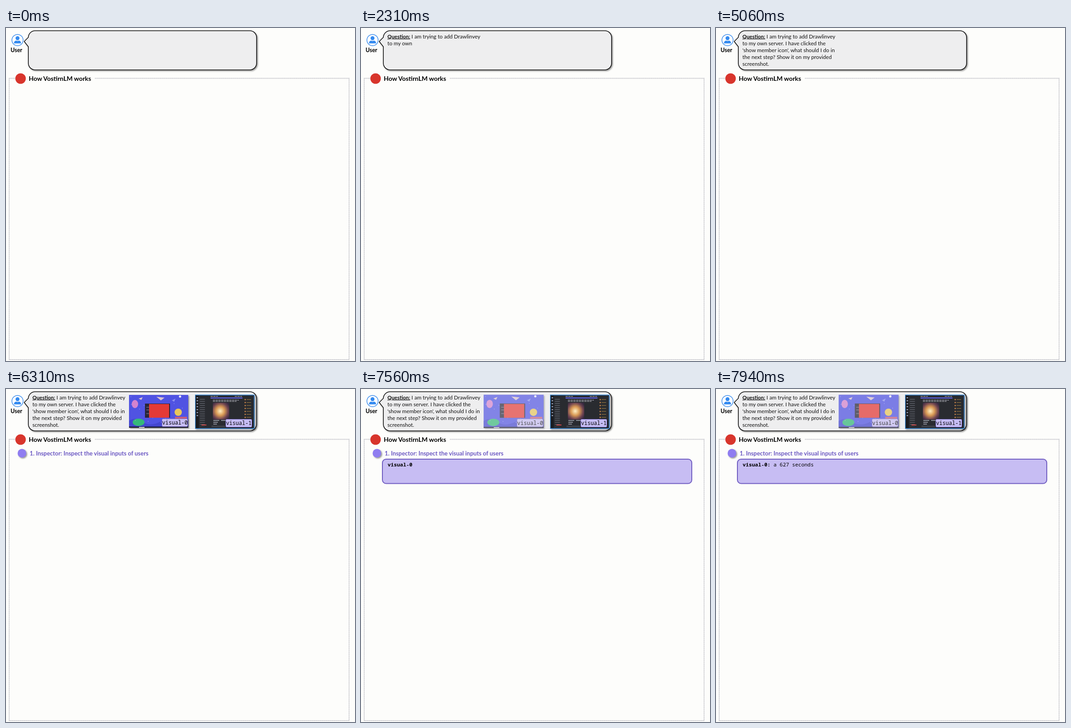
These frames come from a looping animation (766 px wide and 731 px high, 8 s). An HTML page:

```html
<!DOCTYPE html>
<html lang="en">
<head>
<meta charset="utf-8">
<title>Question and inspector</title>
<style>
  html, body { margin: 0; width: 100%; height: 100%; overflow: hidden; background: #fdfdfb; }
  svg { display: block; }
  text { font-family: Lato, sans-serif; white-space: pre; }
  .bold { font-weight: 700; }
  .key { font-weight: 700; font-size: 11.4px; text-decoration: underline; }
  .question { font-size: 11.7px; fill: #111; }
  .mono { font-family: "Noto Sans Mono", monospace; font-size: 11.3px; }
  .tag rect { fill: #c6bdf4; stroke: #8577d2; filter: drop-shadow(1px 1px 1px #0007); }
  .tag text { font-size: 11.7px; }
  .shadow { filter: drop-shadow(2px 2px 1.5px #0006); }
</style>
</head>
<body>
<svg width="766" height="731" viewBox="0 0 766 731">
  <defs>
    <radialGradient id="glow" cx=".45" cy=".5" r=".65">
      <stop offset="0" stop-color="#fff0c4"/>
      <stop offset=".4" stop-color="#d99a55"/>
      <stop offset=".75" stop-color="#6d4350"/>
      <stop offset="1" stop-color="#35283f"/>
    </radialGradient>
  </defs>

  <!-- user and speech bubble -->
  <circle cx="25.3" cy="26.5" r="12.3" fill="#fff" stroke="#3d8ded" stroke-width="1.5"/>
  <g fill="#338af0">
    <circle cx="25.3" cy="22.4" r="4.3"/>
    <path d="M17.5 33.8c0-4 2.5-6 5-6q2.8 1.4 5.6 0c2.6 0 5 2 5 6z"/>
  </g>
  <text class="bold" x="10" y="52.6" font-size="12.4">User</text>
  <path class="shadow" fill="#eeeeef" stroke="#111" stroke-width="1.6"
        d="M64 6H535a15 15 0 0 1 15 15V77a15 15 0 0 1-15 15H64a15 15 0 0 1-15-15V41L40 29.5 49 20.5A15 15 0 0 1 64 6z"/>
  <g id="question"></g>

  <!-- panel -->
  <path d="M195 110.5H753V728H7V110.5H20" fill="none" stroke="#cbcbd0" stroke-width="1.8" stroke-dasharray="2 .6"/>
  <circle cx="32" cy="111" r="11.5" fill="#d8352c"/>
  <text class="bold" x="50" y="115.6" font-size="13.8">How VostirnLM works</text>

  <!-- video thumbnail -->
  <g id="video" data-at="5440">
    <rect class="shadow" x="270" y="13" width="130" height="72" fill="#5053e2"/>
    <path d="M270 70q14-10 30 2t40-1 36 2 24-4V82H270z" fill="#4346cf"/>
    <path d="M270 82.5H400V85H270z" fill="#15152a"/>
    <path d="M292 84.2h12" stroke="#fff" stroke-width="1.4"/>
    <path d="M330 17l18 2-8 6zM291 21l9-3-3 6z" fill="#d9c3cf"/>
    <path d="M364 25l8-4-3 7z" fill="#8d8ff0"/>
    <circle cx="382" cy="16.5" r="2.5" fill="#e8e8fb"/>
    <ellipse cx="283" cy="33" rx="7" ry="9" fill="#d583cf"/>
    <ellipse cx="291" cy="73" rx="13" ry="8" fill="#35b879"/>
    <circle cx="378" cy="51" r="8" fill="#e8c65a"/>
    <rect x="371" y="61" width="26" height="8" fill="#c95e7d"/>
    <g id="stars" fill="#a9abfa"></g>
    <rect x="305" y="32" width="55" height="31" fill="#292638"/>
    <path d="M308 40h7M308 46h7M308 54h7M342 40h14M342 46h14" stroke="#6a6780" stroke-width="1.5"/>
    <rect x="314" y="33" width="44" height="30" fill="#e43a36"/>
    <g class="tag" data-at="6060">
      <rect x="342.5" y="65.5" width="56" height="17" rx="2"/>
      <text class="mono" x="342.7" y="78.3">visual-0</text>
    </g>
  </g>

  <!-- screenshot -->
  <g data-at="5440">
    <rect class="shadow" x="415.7" y="13.2" width="129" height="73.5" fill="#292b30" stroke="#3284d4" stroke-width="1.5"/>
    <path d="M416.5 14H423V86H416.5z" fill="#1b1c20"/>
    <path d="M449 18.5H519V21H449z" fill="#5c5fd8"/>
    <path d="M420 18V62" stroke="#9aa0b8" stroke-width="3" stroke-dasharray="2.5 4"/>
    <path d="M427 22V82" stroke="#777b84" stroke-width="11" stroke-dasharray="1 3.6" transform="translate(4)"/>
    <path d="M454 24.5h57M454 27.3h52M449 16.2h16M502 16.2h16" stroke="#c9cad0" stroke-width="1" stroke-dasharray="5 1"/>
    <rect x="454" y="30" width="36" height="37" fill="url(#glow)"/>
    <path d="M455 69h13M472 69h10M455 73h10M455 77h8" stroke="#8c8e98" stroke-width="2"/>
    <path d="M451 82h30" stroke="#42444c" stroke-width="3"/>
    <path d="M429 79h11" stroke="#c84444" stroke-width="2"/>
    <path d="M525 22V66" stroke="#d58b4b" stroke-width="2.5" stroke-dasharray="2.5 4"/>
    <path d="M533 22.5V66" stroke="#92743f" stroke-width="10" stroke-dasharray="1.2 5.3"/>
    <g class="tag" data-at="6060">
      <rect x="482.5" y="66.5" width="57" height="17" rx="2"/>
      <text class="mono" x="483" y="79.3">visual-1</text>
    </g>
  </g>

  <!-- first step -->
  <g data-at="6310">
    <circle class="shadow" cx="35" cy="141" r="9.5" fill="#8f7df0"/>
    <text class="bold" x="52" y="146.4" font-size="12.9" fill="#6b58c3">1. Inspector: Inspect the visual inputs of users</text>
  </g>
  <rect data-at="7000" x="47" y="154" width="679" height="53.5" rx="8" fill="#c7bdf3" stroke="#705dc1" stroke-width="2"/>
  <text class="mono" x="58.5" y="170"><tspan class="bold" data-at="7500">visual-0</tspan><tspan class="bold" data-at="7630">:</tspan><tspan data-at="7720"> a</tspan><tspan data-at="7820"> 627</tspan><tspan data-at="7930"> seconds</tspan></text>
</svg>

<script>
const LOOP = 8000;
const SVG = "http://www.w3.org/2000/svg";
const lines = [
  "Question: I am trying to add Drawlinvey",
  "to my own server. I have clicked the",
  "'show member icon', what should I do in",
  "the next step? Show it on my provided",
  "screenshot."
];
// word index and the time at which it is typed
const pace = [[0, 1060], [9, 2310], [10, 2440], [23, 3940], [31, 4940]];

function add(parent, tag, attrs, text = "") {
  const el = document.createElementNS(SVG, tag);
  for (const name in attrs) el.setAttribute(name, attrs[name]);
  el.textContent = text;
  return parent.appendChild(el);
}

function wordTime(i) {
  const k = Math.max(1, pace.findIndex(([n]) => n >= i));
  const [n0, t0] = pace[k - 1], [n1, t1] = pace[k];
  return t0 + (t1 - t0) * (i - n0) / (n1 - n0);
}

let count = 0;
lines.forEach((line, row) => {
  const text = add(question, "text", { class: "question", x: 58, y: 22.6 + row * 15.1 });
  line.split(" ").forEach((word, i) => {
    const cls = count ? "" : "key";
    add(text, "tspan", { class: cls, "data-at": wordTime(count++) }, (i ? " " : "") + word);
  });
});

for (let i = 0; i < 16; i++)
  add(stars, "circle", { cx: 274 + i * 47 % 122, cy: 17 + i * 29 % 60, r: .7 });

const timed = [...document.querySelectorAll("[data-at]")];
const video = document.getElementById("video");

// fades to half and back while swelling by 5 %
function pulse(t) {
  const p = Math.min(1, Math.max(0, (t - 7497) / 500));
  const edge = Math.min(p, 1 - p);
  const scale = 1 + .1 * edge;
  video.setAttribute("opacity", 1 - .5 * Math.min(1, edge / .2));
  video.setAttribute("transform", `translate(335 49) scale(${scale}) translate(-335 -49)`);
}

function draw() {
  const t = performance.now() % LOOP;
  for (const el of timed) el.style.visibility = t >= el.dataset.at ? "visible" : "hidden";
  pulse(t);
  requestAnimationFrame(draw);
}
draw();
</script>
</body>
</html>
```
